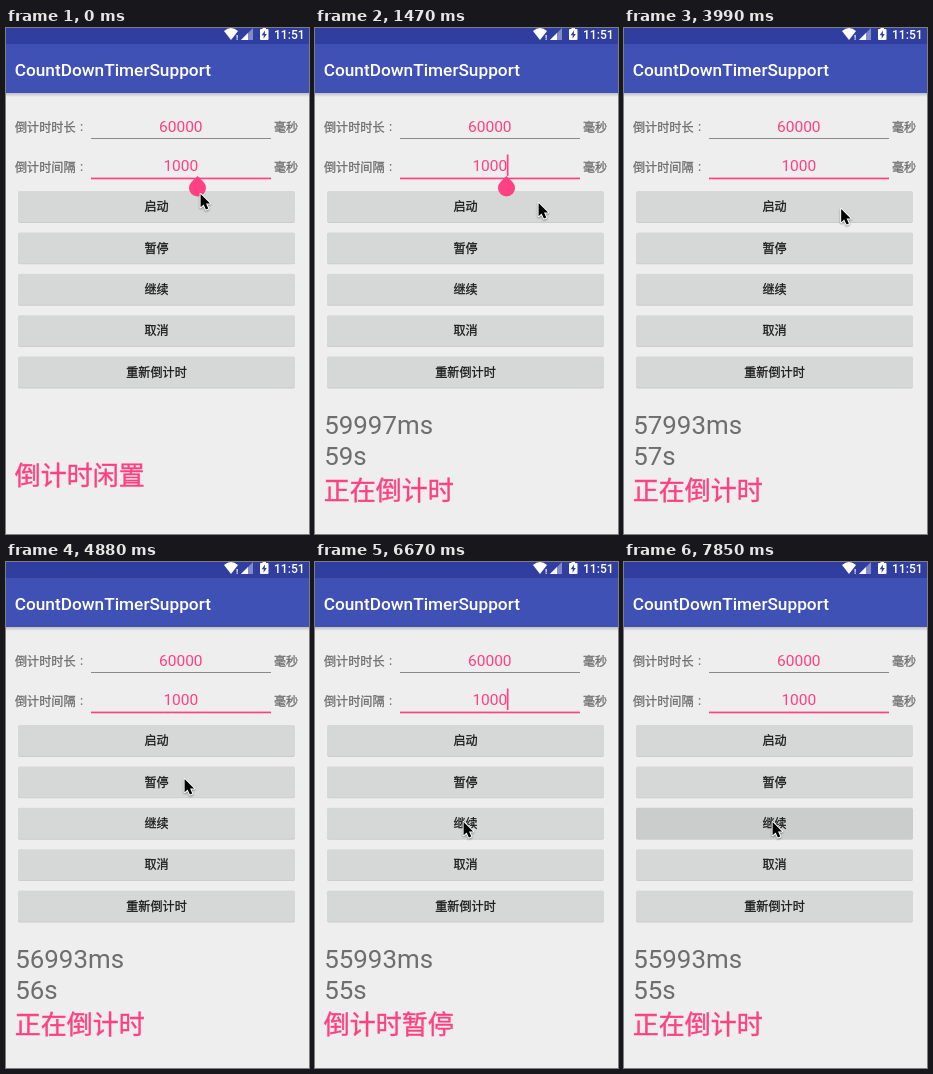
An HTML page with a canvas that plays this animation: 303 by 506 pixels, repeating every 8 s.

```html
<!DOCTYPE html>
<html lang="zh-CN">
<head>
<meta charset="utf-8">
<title>CountDownTimerSupport</title>
<style>
html, body { margin: 0; width: 100%; height: 100%; overflow: hidden; background: #eee; }
canvas { display: block; width: 303px; height: 506px; }
</style>
</head>
<body>
<canvas id="stage"></canvas>
<script>
const W = 303, H = 506, LOOP = 8000, TICK = 148;
const PINK = '#ff4081', GREY = '#6e6e6e', INK = '#1a1a1a', BAR = '#303f9f';
const FONT = 'Roboto, "Noto Sans CJK SC", "Noto Sans CJK", sans-serif';
const BUTTONS = ['启动', '暂停', '继续', '取消', '重新倒计时'];

// Each action glides the pointer between two ticks, then presses a button.
const HOME = { x: 194, y: 165 };
const ACTIONS = [
  { from: 0, to: 7, x: 223, y: 174, press: 8, hold: 2, status: '正在倒计时' },
  { from: 26, to: 33, x: 178, y: 216, press: 37, hold: 3, status: '倒计时暂停' },
  { from: 39, to: 45, x: 148, y: 259, press: 52, hold: 2, status: '正在倒计时' }
];

const canvas = document.getElementById('stage');
const dpr = window.devicePixelRatio || 1;
canvas.width = W * dpr;
canvas.height = H * dpr;
const c = canvas.getContext('2d');

const clamp = (v, lo, hi) => Math.min(hi, Math.max(lo, v));

function text(s, x, y, size, color, align = 'left', weight = 400) {
  c.font = `${weight} ${size}px ${FONT}`;
  c.fillStyle = color;
  c.textAlign = align;
  c.fillText(s, x, y);
}

// Chinese text, slightly emboldened.
function hanzi(s, x, y, size, color, align) {
  text(s, x, y, size, color, align);
  c.strokeStyle = color;
  c.lineWidth = .15 + size * .01;
  c.strokeText(s, x, y);
}

function rect(x, y, w, h, color) {
  c.fillStyle = color;
  c.fillRect(x, y, w, h);
}

function poly(points, color) {
  c.beginPath();
  points.forEach(([x, y]) => c.lineTo(x, y));
  c.closePath();
  c.fillStyle = color;
  c.fill();
}

function round(x, y, w, h, r, color) {
  c.beginPath();
  c.moveTo(x + r, y);
  c.arcTo(x + w, y, x + w, y + h, r);
  c.arcTo(x + w, y + h, x, y + h, r);
  c.arcTo(x, y + h, x, y, r);
  c.arcTo(x, y, x + w, y, r);
  c.fillStyle = color;
  c.fill();
}

function drawBars() {
  const shade = c.createLinearGradient(0, 65, 0, 69);
  shade.addColorStop(0, 'rgba(0,0,0,.2)');
  shade.addColorStop(1, 'rgba(0,0,0,0)');
  rect(0, 65, W, 4, shade);
  rect(0, 0, W, 65, '#3f51b5');
  rect(0, 0, W, 16, BAR);
  text('CountDownTimerSupport', 8.7, 47.7, 17.25, '#fff', 'left', 500);

  c.beginPath();
  c.moveTo(225, 12);
  c.lineTo(218, 3);
  c.quadraticCurveTo(225, -3, 232, 3);
  c.closePath();
  c.fillStyle = '#fff';
  c.fill();
  text('!', 231, 12, 8, '#fff', 'center', 700);
  poly([[235, 12], [247, 12], [247, 0]], 'rgba(255,255,255,.4)');
  poly([[235, 12], [242, 12], [242, 5]], '#fff');
  rect(256.5, 0, 3.5, 2, '#fff');
  round(254, 1, 8.5, 11, 1, '#fff');
  poly([[259, 2.5], [255.7, 7.3], [257.8, 7.3], [257.5, 10.8], [260.8, 5.9], [258.8, 5.9]], BAR);
  text('11:51', 298.7, 11, 12.1, '#fff', 'right', 500);
}

function drawField(label, value, y, line, color) {
  hanzi(label, 9, y + 5, 12.1, GREY);
  text(':', 75.5, y + 4, 12.1, GREY, 'center', 500);
  text(value, 174.8, y + 4.4, 15.5, PINK, 'center');
  hanzi('毫秒', 268, y + 5, 12.1, GREY);
  rect(85, y + 10.6, 180, line, color);
}

function drawButton(label, i, k) {
  const y = 163 + i * 41.4, w = 277, h = 31;
  round(12, y + .9, w, h, 1.8, 'rgba(0,0,0,.15)');
  round(12, y, w, h, 1.8, '#d6d7d7');
  const a = ACTIONS[i];
  if (a && k >= a.press && k < a.press + a.hold) {
    round(12, y, w, h, 1.8, 'rgba(0,0,0,.05)');
    // A longer press also shows the spreading ripple.
    if (a.hold > 2 && k > a.press) rect(19.5, y, 263.5, h, 'rgba(0,0,0,.035)');
  }
  hanzi(label, 150.5, y + 20.2, 12.1, INK, 'center');
}

function drawCaret(k) {
  const blinks = Math.floor((k - 2.55) / 3.363);
  if (blinks >= 0 && blinks % 2 === 0) rect(191.8, 126.5, 1.7, 21.5, PINK);
}

function drawHandle() {
  c.beginPath();
  c.moveTo(191.5, 148);
  c.lineTo(197.5, 154);
  c.arc(191.5, 160, 8.5, -Math.PI / 4, Math.PI * 1.25);
  c.closePath();
  c.fillStyle = PINK;
  c.fill();
}

function drawCount(k) {
  const current = ACTIONS.filter(a => k > a.press).pop();
  if (!current) {
    hanzi('倒计时闲置', 8.8, 457, 26, PINK);
    return;
  }
  const n = clamp(Math.floor((k - 8.1) / 6.7), 0, 4);
  const sec = 59 - n;
  text(sec * 1000 + (n < 2 ? 997 : 993) + 'ms', 9.2, 406, 25.9, GREY);
  text(sec + 's', 9.2, 436.5, 25.9, GREY);
  hanzi(current.status, 8.8, 472.3, 26, PINK);
}

function drawPointer(k) {
  let { x, y } = HOME;
  for (const a of ACTIONS) {
    const f = clamp((k - a.from) / (a.to - a.from), 0, 1);
    x += (a.x - x) * f;
    y += (a.y - y) * f;
  }
  c.save();
  c.translate(x, y);
  c.beginPath();
  [[.6, 1], [.6, 14.2], [3.6, 11.4], [5.9, 16.6], [8.3, 15.6], [6, 10.5], [10.1, 10.4]]
    .forEach(([px, py]) => c.lineTo(px, py));
  c.closePath();
  c.lineJoin = 'round';
  c.lineWidth = 2;
  c.strokeStyle = '#fff';
  c.shadowColor = 'rgba(0,0,0,.4)';
  c.shadowBlur = 2 * dpr;
  c.shadowOffsetY = dpr;
  c.stroke();
  c.shadowColor = 'transparent';
  c.fillStyle = '#000';
  c.fill();
  c.restore();
}

function draw(t) {
  // The screen refreshes in steps of one tick.
  const k = Math.floor((t + 10) / TICK);
  c.setTransform(dpr, 0, 0, dpr, 0, 0);
  rect(0, 0, W, H, '#eee');
  drawBars();
  drawField('倒计时时长', '60000', 99.4, 1, '#8a8a8a');
  drawField('倒计时间隔', '1000', 139, 1.7, PINK);
  BUTTONS.forEach((label, i) => drawButton(label, i, k));
  drawCaret(k);
  if (k < 23) drawHandle();
  drawCount(k);
  drawPointer(k);
}

const start = performance.now();
function loop() {
  draw((performance.now() - start) % LOOP);
  requestAnimationFrame(loop);
}
loop();
</script>
</body>
</html>
```
